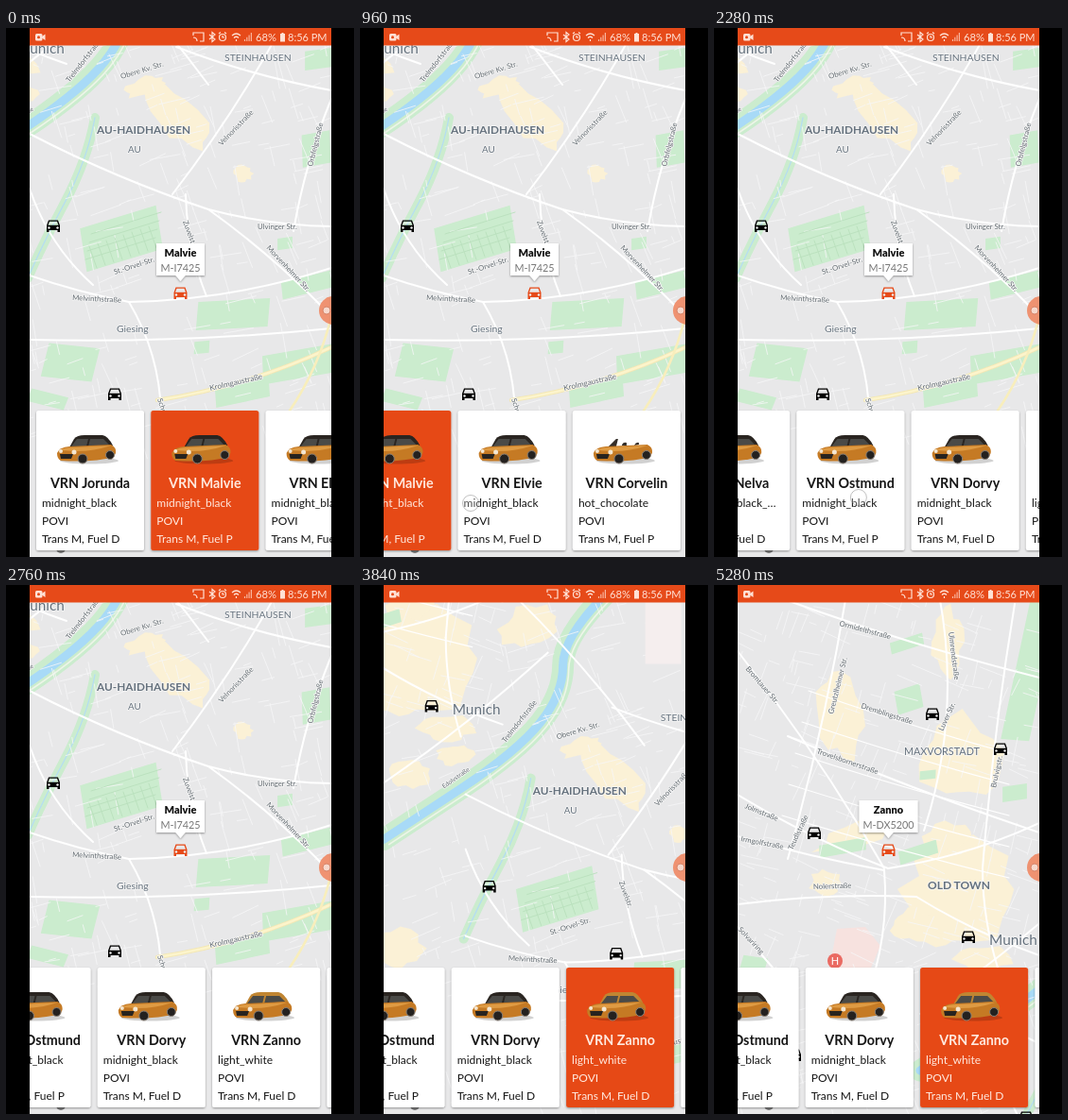
Write an HTML page that moves like this. It is 368 px wide and 560 px high and loops after 5520 ms.

```html
<!DOCTYPE html>
<html lang="en">
<head>
<meta charset="utf-8">
<title>Car sharing map</title>
<style>
  html, body { margin: 0; width: 100%; height: 100%; overflow: hidden; background: #000; }
  svg { display: block; }
  text { font-family: Lato, sans-serif; }
  .label text { fill: #626a70; stroke: #f5f5f5; stroke-width: 1.6px; paint-order: stroke; }
  .label .place { fill: #65717d; }
  .card { fill: #161616; }
  .card rect { fill: #fff; }
  .card.on { fill: #ffe9df; }
  .card.on rect { fill: #e64a19; }
</style>
</head>
<body>
<svg id="stage" width="368" height="560" viewBox="0 0 368 560"></svg>
<script>
const LOOP = 5520, STEP = 120, PICK = 3480;
const PAN = [280, 354], PITCH = 121.3;
const ORANGE = '#e64a19', GREEN = '#cbecce', BEIGE = '#fbf1d6', BLUE = '#a8daf7';

let seed = 11;
const rnd = () => (seed = seed * 16807 % 2147483647) / 2147483647;
const repeat = (n, make) => Array.from({ length: n }, (_, i) => make(i)).join('');
const each = (rows, make) => rows.map(row => make(...row)).join('');

// Map parts
const park = (x, y, w, h, angle) =>
  `<rect x="${-w / 2}" y="${-h / 2}" width="${w}" height="${h}" fill="${GREEN}" transform="translate(${x} ${y}) rotate(${angle}) skewX(-8)"/>`;

function quarter(x, y, rx, ry, angle = 0) {
  const points = repeat(18, i => {
    const a = i / 18 * 2 * Math.PI, r = .72 + rnd() * .42;
    return `${(rx * r * Math.cos(a)).toFixed(1)},${(ry * r * Math.sin(a)).toFixed(1)} `;
  });
  return `<polygon points="${points}" fill="${BEIGE}" transform="translate(${x} ${y}) rotate(${angle})"/>`;
}

const stroke = (d, width, color) =>
  `<path d="${d}" fill="none" stroke="${color}" stroke-width="${width}" stroke-linecap="round" stroke-linejoin="round"/>`;

// A street from one end to the other, bowed sideways by `bend`.
function avenue(x0, y0, x1, y1, bend = 0, width = 2, color = '#fff') {
  const len = Math.hypot(x1 - x0, y1 - y0);
  const cx = (x0 + x1) / 2 - (y1 - y0) / len * bend * 2, cy = (y0 + y1) / 2 + (x1 - x0) / len * bend * 2;
  return stroke(`M${x0} ${y0}Q${cx} ${cy} ${x1} ${y1}`, width, color);
}

const sideStreets = () => stroke(repeat(1000, () => {
  const x = rnd() * 640 - 270, y = rnd() * 800 - 360, len = 6 + rnd() * 28;
  const a = (y < 40 && x < 60 ? .32 : -.3) + (rnd() < .5 ? Math.PI / 2 : 0) + (rnd() - .5) * .3;
  return `M${x.toFixed(1)} ${y.toFixed(1)}l${(len * Math.cos(a)).toFixed(1)} ${(len * Math.sin(a)).toFixed(1)}`;
}), .8, '#f7f7f8');

const street = (x, y, angle, name, size = 7.8) =>
  `<text transform="translate(${x} ${y}) rotate(${angle})" font-size="${size}">${name}</text>`;
const place = (x, y, size, name, weight = 400) =>
  `<text class="place" x="${x}" y="${y}" font-size="${size}" font-weight="${weight}">${name}</text>`;

const river = 'M-62 160L20 106Q80 66 104 36T128 -25T178 -105';
const stream = 'M94 95Q86 140 62 185T23 265';
const toNorth = `transform="translate(${-PAN[0]} ${-PAN[1]})"`;

const south = () =>
  each([[182, 94, 52, 21, 46], [146, 62, 24, 10, -18], [251, 154, 10, 9], [-30, -80, 30, 22], [-40, 5, 34, 26],
    [92, -66, 32, 22, -20], [14, 70, 20, 12], [-35, 90, 24, 16], [-50, 275, 32, 22]], quarter) +
  each([[122, 223, 84, 46, -17], [240, 303, 76, 30, -3], [318, 272, 54, 18, -14], [308, 356, 74, 30, -10], [250, 386, 58, 20, -12],
    [68, 354, 54, 36, 6], [44, 393, 40, 14, 14], [207, 338, 16, 13, -5], [328, 128, 30, 34, -10], [330, 33, 28, 20, -8],
    [295, 228, 16, 12, -8]], park) +
  stroke(stream, 10, GREEN) + stroke(river, 23, GREEN) + stroke(stream, 1.3, '#b5ddf2') +
  stroke(river, 9, BLUE) + `<g transform="translate(6 5)">${stroke(river, 1.6, '#eef5e8')}</g>`;

const north = () =>
  each([[262, 322, 66, 56], [260, 183, 42, 46, 12], [247, 60, 17, 38], [132, 138, 25, 50, -14], [150, 266, 46, 13, -20],
    [118, 316, 18, 14], [210, 360, 26, 18], [285, 396, 30, 14]], quarter) +
  `<polygon points="130,364 160,362 176,382 166,405 122,405" fill="#f7e2df"/>` +
  each([[206, 121, 28, 25, -18], [204, 62, 36, 12, -18], [226, 201, 17, 9, -6], [136, 278, 50, 13, -10], [216, 283, 42, 14, -18],
    [334, 90, 30, 150, 4], [38, 415, 26, 44, 8], [318, 220, 26, 16, -8]], park);

const southRoads = () =>
  each([[25, 262, 130, 290, 2], [130, 290, 344, 254, 8], [130, 290, 164, 408, -8], [25, 112, 214, 192, 4], [214, 192, 344, 210, 4],
    [214, 192, 344, 305, -4], [176, 176, 312, -40, 6], [190, 176, 212, 284, 5], [344, 75, 304, 215, 4], [25, 170, 92, 272, 8],
    [180, 20, 344, 66, 4], [-62, 100, 112, -38, 4], [80, -95, 214, 60, -4], [25, 330, 344, 318, 5]], avenue) +
  avenue(160, 394, 344, 338, 7, 4.4, '#f3e7b4') + avenue(160, 394, 344, 338, 7, 2.8, '#fcf4cb') + avenue(300, 405, 344, 305, 5, 2.6, '#f8eebc');

const northRoads = () =>
  each([[60, 10, 344, 98, 4], [25, 70, 180, 300, -5], [140, 10, 78, 290, -4], [25, 222, 184, 300, 4], [184, 300, 344, 252, 6],
    [25, 266, 180, 302, 2], [78, 160, 344, 262, 3], [238, 10, 222, 260, -16], [318, 20, 284, 300, 3], [284, 300, 300, 405, 4],
    [25, 338, 214, 330, -4], [214, 330, 344, 392, 4], [25, 362, 62, 405], [180, 302, 160, 440, -8]], avenue) +
  repeat(5, i => avenue(100 - i * 7, 112 + i * 33, 312, 178 + i * 33, 2, 1.2));

// Markers, callouts and cards
const marker = (x, y, id = 'plain') => `<g data-marker="${id}" transform="translate(${x} ${y})">
  <path d="M-7 6V-1L-5-6.500H5L7-1V6H4.500V4H-4.500V6ZM-5.500-1.300H5.500L4-5.300H-4Z" fill-rule="evenodd"/>
  <circle cx="-4.500" cy="1.500" r="1.200" fill="#eee"/><circle cx="4.500" cy="1.500" r="1.200" fill="#eee"/></g>`;

const callout = (id, x, y, half, name, plate) => `<g id="${id}" transform="translate(${x} ${y})" text-anchor="middle">
  <path d="M${-half}-54H${half}V-20H5L0-14L-5-20H${-half}Z" fill="#fff" filter="url(#shadow)"/>
  <text y="-40" font-size="11" font-weight="900" fill="#111">${name}</text>
  <text y="-24.500" font-size="10.800" fill="#777">${plate}</text></g>`;

const cabin = kind => kind === 'open'
  ? '<path d="M17 13L25 5L27 5L25 13ZM31 12Q32 8 36 9V12ZM44 12Q46 8 49 9V11Z" fill="#342e29"/>'
  : `<path d="M19 5Q22 1 30 1H49Q55 2 60 12L14 14Z" fill="${kind === 'long' ? '#c08532' : '#2a2521'}"/>
     <path d="M16 13L22 5H34L32 13ZM36 5H50L56 11L34 13Z" fill="#4a4a47"/>`;

const photo = kind => `<g transform="translate(21 430)">
  <ellipse cx="35" cy="28" rx="31" ry="3.500" fill="#000" opacity=".18"/>${cabin(kind)}
  <path d="M1 20Q3 14 14 13L58 11Q64 14 63 20L61 24Q40 30 5 28Q1 26 1 20Z" fill="#c57a24"/>
  <path d="M4 17Q9 14 18 14L58 12Q40 18 22 18Z" fill="#df9b43"/>
  <path d="M4 21H18L16 26H5Z" fill="#27231f"/>
  <circle cx="5" cy="18" r="2" fill="#f4e7d2"/><circle cx="19" cy="19" r="2.500" fill="#f4e7d2"/>
  <g fill="#24211f" stroke="#8a8178"><circle cx="28" cy="26" r="5"/><circle cx="57" cy="22" r="4.500"/></g></g>`;

const cars = [['Jorunda', 'midnight_black', 'D'], ['Malvie', 'midnight_black', 'P'], ['Elvie', 'midnight_black', 'D'],
  ['Corvelin', 'hot_chocolate', 'P', 'open'], ['Nelva', 'midnight_black_…', 'D'], ['Ostmund', 'midnight_black', 'P'],
  ['Dorvy', 'midnight_black', 'D'], ['Zanno', 'light_white', 'D', 'long'], ['Ulda', 'light_white', 'P']];

const card = ([name, paint, fuel, kind], i) => `<g class="card" id="card${i}" transform="translate(${32 + i * PITCH} 0)">
  <rect y="405" width="114" height="148" rx="2.500" filter="url(#shadow)"/>${photo(kind)}
  <text x="57" y="486.500" font-size="14.300" font-weight="700" text-anchor="middle">VRN ${name}</text>
  <g font-size="12"><text x="6" y="507">${paint}</text><text x="6" y="525.500">POVI</text><text x="6" y="545">Trans M, Fuel ${fuel}</text></g></g>`;

const statusBar = `<rect x="25" width="319" height="18.500" fill="${ORANGE}"/>
  <g fill="none" stroke="#ffe1d5" stroke-width="1.200">
    <path d="M198 8V5H209V14H205M198 10Q202 10 202 14M215 7L221 12L218 14.500V4.500L221 7L215 12"/>
    <circle cx="229" cy="10" r="3.500"/><path d="M229 8V10H231M225 6L227 4.500M233 6L231 4.500M239 8Q243.500 4 248 8M241 10.500Q243.500 8 246 10.500M243.500 12V14"/>
    ${repeat(4, i => `<path d="M${252.5 + i * 2.3} 14v${-2 - i * 2.3}" opacity=".7"/>`)}</g>
  <g fill="#ffe1d5"><rect x="31" y="6" width="7.500" height="7.500" rx="1.500"/><path d="M38 9L41.500 6.500V13L38 10.500ZM290 6H291.500V5H293.500V6H295V14.500H290Z"/>
    <circle cx="34.500" cy="9.700" r="1.500" fill="${ORANGE}"/>
    <text x="264" y="13.500" font-size="11.200">68%</text><text x="298" y="13.500" font-size="11">8:56 PM</text></g>`;

const stage = document.getElementById('stage');
stage.innerHTML = `<defs><filter id="shadow" x="-10%" y="-10%" width="120%" height="125%">
    <feDropShadow dx="0" dy="1" stdDeviation="1.2" flood-opacity=".38"/></filter></defs>
<svg x="25" width="319" height="560" viewBox="25 0 319 560">
  <rect x="25" width="319" height="560" fill="#e8e8e9"/>
  <g id="map">
    ${south()}<g ${toNorth}>${north()}</g>${sideStreets()}
    ${repeat(8, i => avenue(88 + i * 9, 231 - i * 3, 96 + i * 9, 254 - i * 3, 0, .9, '#b9e0bd'))}
    ${repeat(4, i => avenue(84 + i * 2, 245 - i * 9, 158 + i * 2, 222 - i * 9, 0, .9, '#b9e0bd'))}
    ${southRoads()}<g ${toNorth}>${northRoads()}</g>
    <rect id="corner" x="215" y="-91" width="38" height="65" fill="#f5eeee"/>
    <g class="label">
      ${place(11, 27, 15.4, 'Munich')}${place(96, 112, 11.8, 'AU-HAIDHAUSEN', 700)}${place(129, 132, 9.8, 'AU')}
      ${place(231, 34.5, 10.4, 'STEINHAUSEN')}${place(117, 322, 10.4, 'Giesing')}
      ${street(67, 58, -52, 'Trelmdorfstraße')}${street(122, 54, -17, 'Obere Kv. Str.')}${street(228, 125, -46, 'Velnorisstraße')}
      ${street(266, 213, 0, 'Ulvinger Str.')}${street(324, 147, -76, 'Orbfelgstraße')}${street(187, 205, 70, 'Zuvelstr.')}
      ${street(115, 261, -18, 'St.-Orvel-Str.')}${street(275, 233, 47, 'Morvenhelmer Str.')}${street(70, 288, 3, 'Melvinthstraße')}
      ${street(216, 384, -13, 'Krolmgaustraße', 8.2)}${street(160, 393, 72, 'Schulvstr.')}${street(2, 106, -35, 'Edolvstraße', 6.5)}
    </g>
    <g class="label" id="names" ${toNorth}>
      ${place(201, 180, 10.8, 'MAXVORSTADT')}${place(226, 322, 12, 'OLD TOWN', 700)}
      ${street(132, 43, 15, 'Ormidelthstraße')}${street(126, 137, -76, 'Greutzlheimer Str.')}${street(33, 89, 49, 'Bromtauer Str.')}
      ${street(248, 50, 83, 'Ulmrendstraße')}${street(155, 130, 18, 'Dremblingstraße')}${street(242, 155, -65, 'Luver Str.')}
      ${street(298, 215, -78, 'Brulvigstr.')}${street(108, 178, 19, 'Trovelsbornerstraße')}${street(32, 236, 22, 'Jolmstraße')}
      ${street(28, 271, 11, 'Irmgolfstraße')}${street(83, 281, -65, 'Teudlstraße')}${street(105, 322, -2, 'Nolerstraße')}
      ${street(25, 365, 47, 'Solvariring')}
      <circle cx="128" cy="398" r="8" fill="#ea6a62"/><text x="128" y="402" font-size="11" text-anchor="middle" style="fill:#fff;stroke:none">H</text>
    </g>
    <g id="blank"><rect x="-330" y="-430" width="145" height="600" fill="#f0ecec"/>
      ${repeat(4, i => avenue(-245, -235 + i * 68, -190, -258 + i * 68, 3, 9, '#faf8f8'))}
      ${avenue(-228, -220, -240, 20, 5, 9, '#faf8f8')}${avenue(-208, -250, -206, 20, 0, 8, '#faf8f8')}</g>
    ${marker(50, 210)}${marker(115, 388)}${marker(184.5, 281, 'first')}
    <g ${toNorth}>${marker(231, 137)}${marker(303, 174)}${marker(106, 263)}${marker(269, 373)}${marker(85, 498)}${marker(184.5, 281, 'second')}</g>
    ${callout('tipA', 184.5, 282, 25.5, 'Malvie', 'M-I7425')}
    ${callout('tipB', 184.5 - PAN[0], 282 - PAN[1], 31, 'Zanno', 'M-DX5200')}
  </g>
  <circle cx="58" cy="551" r="5" fill="#777"/>
  <circle cx="346" cy="299" r="15" fill="#ef8a66" opacity=".92"/><circle cx="339" cy="299" r="4" fill="#f7d8cc" stroke="#d98468"/>
  <g id="cards">${cars.map(card).join('')}</g>
  <circle id="touch" r="8.500" fill="#fff" fill-opacity=".25" stroke="#777" stroke-opacity=".45"/>
  ${statusBar}
</svg>`;

const el = id => document.getElementById(id);
const show = (id, on) => el(id).setAttribute('display', on ? 'inline' : 'none');
const move = (id, x, y) => el(id).setAttribute('transform', `translate(${x} ${y})`);
const tint = (name, color) => stage.querySelector(`[data-marker=${name}]`).setAttribute('fill', color);

// Slow start and end: 0 before `from`, 1 after `from + span`.
function ease(t, from, span) {
  const u = Math.min(1, Math.max(0, (t - from) / span));
  return (1 - Math.cos(Math.PI * u)) / 2;
}

const scrollAt = t => 342 * ease(t, 240, 1440) + 321 * ease(t, 1560, 1204);

function touchAt(t, scroll) {
  if (t >= 360 && t <= 960) return [288 - scroll, 503];
  if (t >= 1920 && t <= 2280) return [704 - scroll, 497];
  if (t >= 3120 && t < PICK) return [275, 481];
}

function draw() {
  const t = Math.floor((performance.now() - start) % LOOP / STEP) * STEP;
  const scroll = scrollAt(t), picked = t >= PICK, pan = ease(t, 3470, 985);
  move('map', PAN[0] * pan, PAN[1] * pan);
  move('cards', -scroll, 0);
  el('card1').classList.toggle('on', !picked);
  el('card7').classList.toggle('on', picked);
  tint('first', picked ? '#000' : ORANGE);
  tint('second', picked ? ORANGE : '#000');
  show('tipA', !picked);
  show('tipB', picked);
  show('corner', picked && t < 4080);
  show('blank', t < 4680);
  show('names', t >= 4560);
  const touch = touchAt(t, scroll);
  show('touch', touch);
  if (touch) move('touch', ...touch);
  requestAnimationFrame(draw);
}
const start = performance.now();
draw();
</script>
</body>
</html>
```
